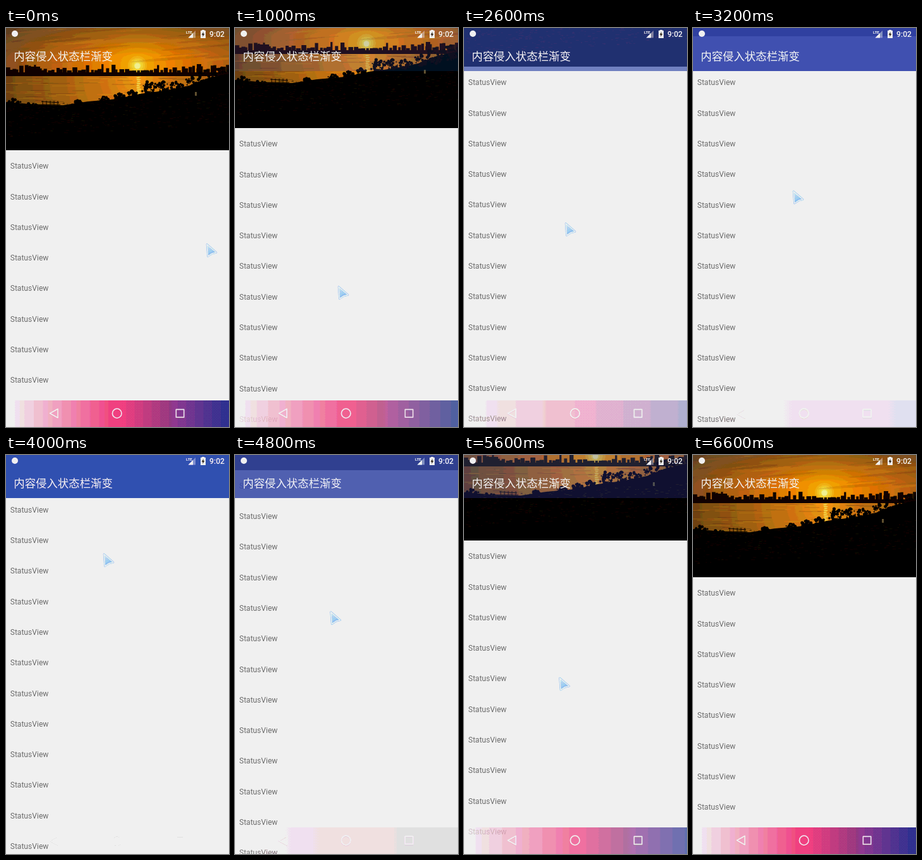
These frames come from a looping animation (353 px wide and 630 px high, 6.8 s). An HTML page with a canvas:

```html
<!DOCTYPE html>
<html lang="zh-CN">
<head>
<meta charset="utf-8">
<title>Status bar fade</title>
<style>
html, body { margin: 0; width: 100%; height: 100%; overflow: hidden; background: #f0f0f0; }
canvas { display: block; width: 353px; height: 630px; }
</style>
</head>
<body>
<canvas id="stage" width="353" height="630"></canvas>
<script>
const W = 353, H = 630, PHOTO_H = 193, BAR_H = 68, NAV_Y = 588;
const LOOP = 6800, STEP = 200, ROW = 48.28;
const ctx = document.getElementById('stage').getContext('2d', { willReadFrequently: true });

// time, scroll, cursor x, cursor y
const KEYS = [
  [0, 0, 325, 351],
  [400, 0, 172, 453],
  [1000, 35, 171, 418],
  [1800, 92, 169, 361],
  [2600, 132, 168, 318],
  [2800, 132, 168, 318],
  [4000, 276.3, 162, 166],
  [5200, 116, 157, 303],
  [6000, 0, 160, 420],
  [6400, 0, 272, 604],
  [6600, 0, 290, 680],
  [6800, 0, 290, 680]
];

function poseAt(t) {
  const i = KEYS.findIndex((k, n) => n > 0 && t < k[0]);
  const a = KEYS[i - 1], b = KEYS[i];
  const p = (t - a[0]) / (b[0] - a[0]);
  return a.map((v, n) => v + (b[n] - v) * p);
}

function randomizer(seed) {
  return () => (seed = (seed * 16807) % 2147483647) / 2147483647;
}

function fill(c, gradient, stops, x, y, w, h) {
  stops.forEach(([at, color]) => gradient.addColorStop(at, color));
  c.fillStyle = gradient;
  c.fillRect(x, y, w, h);
}

function poly(c, points) {
  c.beginPath();
  points.forEach(([x, y]) => c.lineTo(x, y));
  c.closePath();
}

function dot(c, x, y, r) {
  c.beginPath();
  c.arc(x, y, r, 0, Math.PI * 2);
  c.fill();
}

function paintPhoto() {
  const canvas = document.createElement('canvas');
  canvas.width = W;
  canvas.height = PHOTO_H;
  const c = canvas.getContext('2d');
  const rnd = randomizer(4711);

  // sky
  fill(c, c.createRadialGradient(208, 59, 0, 208, 59, 235),
    [[0, '#fff4a0'], [.025, '#ffe040'], [.07, '#ffa808'], [.25, '#f08408'], [.55, '#c46c14'], [1, '#7c5028']],
    0, 0, W, 76);
  fill(c, c.createLinearGradient(0, 0, 0, 46),
    [[0, 'rgba(72,68,48,.5)'], [1, 'rgba(90,60,30,0)']], 0, 0, W, 46);
  for (let i = 0; i < 26; i++) {
    c.fillStyle = i % 2 ? 'rgba(255,160,30,.13)' : 'rgba(80,50,30,.14)';
    c.beginPath();
    c.ellipse(rnd() * W, rnd() * 52, 20 + rnd() * 45, 1 + rnd() * 2, -.08, 0, 7);
    c.fill();
  }
  c.fillStyle = '#fff49c';
  dot(c, 208, 60, 4.5);

  // water
  fill(c, c.createRadialGradient(208, 78, 2, 208, 78, 220),
    [[0, '#f8a020'], [.2, '#d88018'], [.5, '#b06c18'], [1, '#704818']], 0, 75, W, 52);
  for (let i = 0; i < 60; i++) {
    c.fillStyle = i % 2 ? 'rgba(255,170,50,.2)' : 'rgba(50,25,0,.22)';
    c.fillRect(rnd() * W - 15, 77 + rnd() * 42, 15 + rnd() * 35, 1);
  }
  for (let y = 76; y < 106; y++) {
    c.fillStyle = y % 3 ? '#ffb020' : '#ffe060';
    c.fillRect(206 + rnd() * 2, y, 4 + rnd() * 3, 1);
  }

  // skyline
  c.fillStyle = '#1c0e04';
  c.fillRect(0, 70, W, 6);
  for (let x = 0; x < W; x += 4 + rnd() * 5) {
    const low = x > 190 && x < 228;
    const h = low ? 2 + rnd() * 3 : 3 + rnd() * (x > 125 && x < 190 ? 13 : 9);
    c.fillRect(x, 70 - h, 3 + rnd() * 5, h + 1);
  }
  c.fillRect(302, 57, 7, 14);
  c.fillRect(32, 61, 22, 10);

  // shore and bushes
  c.fillStyle = '#050300';
  poly(c, [[0, 117], [50, 121], [90, 122], [130, 116], [175, 112], [212, 104],
    [250, 99], [290, 91], [320, 79], [W, 72], [W, PHOTO_H], [0, PHOTO_H]]);
  c.fill();
  const bush = (x, y, r) => {
    for (let i = 0; i < 34; i++) {
      const a = rnd() * 6.28, d = Math.sqrt(rnd()) * r;
      dot(c, x + Math.cos(a) * d, y + Math.sin(a) * d * .75, .7 + rnd() * 2);
    }
  };
  c.fillStyle = '#0a0602';
  [[226, 94, 13], [247, 91, 12], [270, 92, 10], [297, 85, 13], [317, 79, 16], [341, 75, 16],
    [155, 114, 8], [180, 109, 8], [200, 105, 8], [12, 121, 13], [40, 124, 9], [115, 118, 6]]
    .forEach(b => bush(...b));

  // jetty
  c.strokeStyle = '#100a02';
  c.lineWidth = 1;
  c.beginPath();
  c.moveTo(42, 121);
  c.lineTo(86, 121);
  for (let x = 58; x < 86; x += 6) {
    c.moveTo(x, 115);
    c.lineTo(x, 124);
  }
  c.moveTo(56, 116);
  c.lineTo(84, 118);
  c.stroke();

  // faint ground texture
  for (let i = 0; i < 420; i++) {
    const x = rnd() * W, y = 122 + rnd() * 50 - x * .06;
    c.fillStyle = i % 3 ? 'rgba(34,20,4,.65)' : 'rgba(50,30,10,.55)';
    c.fillRect(x, y, 1 + rnd() * 5, 1);
  }
  c.fillStyle = '#605038';
  c.fillRect(299, 101, 3, 6);
  return canvas;
}

const photo = paintPhoto();

function label(text, x, y, font, color) {
  ctx.font = font;
  ctx.fillStyle = color;
  ctx.fillText(text, x, y);
}

function drawStatus() {
  ctx.fillStyle = '#fff';
  dot(ctx, 14, 9, 5);
  label('LTE', 285, 9, '700 6px Roboto, sans-serif', '#fff');
  ctx.fillStyle = 'rgba(255,255,255,.4)';
  poly(ctx, [[300, 4], [300, 15.5], [288.5, 15.5]]);
  ctx.fill();
  ctx.fillStyle = '#fff';
  poly(ctx, [[296, 8], [296, 15.5], [288.5, 15.5]]);
  ctx.fill();
  ctx.fillRect(310, 3, 4, 2);
  ctx.fillRect(308, 4, 8, 12);
  ctx.fillStyle = '#302818';
  poly(ctx, [[312.6, 6], [309.6, 10.7], [311.5, 10.7], [311.3, 14], [314.4, 9.2], [312.5, 9.2]]);
  ctx.fill();
  label('9:02', 322, 14.3, '500 12.2px Roboto, sans-serif', '#fff');
}

function strokeIcons(dy, color) {
  ctx.save();
  ctx.translate(0, dy);
  ctx.strokeStyle = color;
  ctx.lineWidth = 1.7;
  ctx.lineJoin = 'round';
  poly(ctx, [[69.5, 608.5], [82, 601.5], [82, 615.5]]);
  ctx.stroke();
  ctx.beginPath();
  ctx.arc(175.7, 608.5, 7.3, 0, Math.PI * 2);
  ctx.stroke();
  ctx.strokeRect(269.3, 602.3, 12.4, 12.4);
  ctx.restore();
}

function drawNav(alpha) {
  ctx.globalAlpha = alpha;
  fill(ctx, ctx.createLinearGradient(0, 0, W, 0),
    [[0, '#fff'], [.5, '#ff4081'], [1, '#303f9f']], 0, NAV_Y, W, H - NAV_Y);
  ctx.globalAlpha = 1;
  strokeIcons(1, 'rgba(0,0,0,.06)');
  strokeIcons(0, 'rgba(255,255,255,.9)');
}

function drawCursor(x, y) {
  ctx.save();
  ctx.translate(x, y);
  ctx.lineJoin = 'round';
  poly(ctx, [[-7, -9.5], [8, 3.5], [1.5, 5], [-5.5, 9.5]]);
  ctx.strokeStyle = '#90c4ec';
  ctx.lineWidth = 2.6;
  ctx.translate(.7, .7);
  ctx.stroke();
  ctx.translate(-.7, -.7);
  const g = ctx.createLinearGradient(-6, -8, 3, 8);
  g.addColorStop(0, '#d4ecfc');
  g.addColorStop(1, '#84c0ec');
  ctx.fillStyle = g;
  ctx.fill();
  ctx.strokeStyle = '#f4f8ff';
  ctx.lineWidth = 1.5;
  ctx.stroke();
  ctx.restore();
}

// Flat colour bands: sixteen levels per channel
function posterize() {
  const img = ctx.getImageData(0, 0, W, H), d = img.data;
  for (let i = 0; i < d.length; i++) if (i % 4 < 3) d[i] &= 0xf0;
  ctx.putImageData(img, 0, 0);
}

function draw(t) {
  const [, scroll, x, y] = poseAt(t);
  const ratio = Math.min(scroll / PHOTO_H, 1);

  ctx.fillStyle = '#fafafa';
  ctx.fillRect(0, 0, W, H);
  ctx.drawImage(photo, 0, Math.round(-scroll));
  for (let i = 0; i < 20; i++) {
    label('StatusView', 6.7, 222.3 + i * ROW - scroll, '12.1px Roboto, sans-serif', '#737373');
  }

  ctx.globalAlpha = ratio;
  ctx.fillStyle = '#3f51b5';
  ctx.fillRect(0, 0, W, BAR_H);
  ctx.globalAlpha = 1;
  label('内容侵入状态栏渐变', 12.3, 50.6, '17.4px "Noto Sans CJK SC", "Noto Sans CJK", sans-serif', '#fff');
  drawStatus();
  drawNav(1 - ratio);
  drawCursor(x, y);
  posterize();
}

let shown = -1;
const start = performance.now();
function tick() {
  const t = Math.floor(((performance.now() - start) % LOOP) / STEP) * STEP;
  if (t !== shown) draw(shown = t);
  requestAnimationFrame(tick);
}
tick();
</script>
</body>
</html>
```
